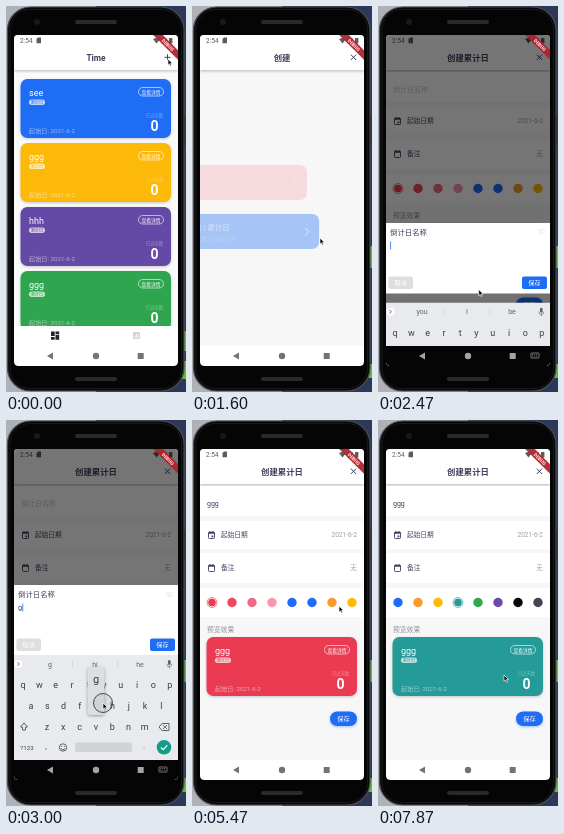
An HTML page with a canvas for the animation above (8 s loop, 180x386 px).

```html
<!DOCTYPE html>
<html lang="zh">
<head>
<meta charset="utf-8">
<style>
html, body { margin: 0; width: 100%; height: 100%; overflow: hidden; background: #20283a; }
canvas { display: block; width: 180px; height: 386px; }
</style>
</head>
<body>
<canvas id="stage"></canvas>
<script>
const canvas = document.getElementById('stage');
const g = canvas.getContext('2d');
const dpr = window.devicePixelRatio || 1;
canvas.width = 180 * dpr;
canvas.height = 386 * dpr;

const LOOP = 8000;
const INK = '#40415f', BLUE = '#1f6cf5', RED = '#eb3b53', TEAL = '#249a99';
const FONT = 'Roboto, "Noto Sans CJK SC", "Noto Sans CJK", sans-serif';
const SWATCHES = [RED, '#ed4860', '#f06c84', '#f797aa', BLUE, BLUE, '#f99a2c', '#fdba0a',
  TEAL, '#33a853', '#6c4aaa', '#08080a', '#454354'];

const clamp = v => Math.max(0, Math.min(1, v));
const ramp = (t, a, b) => clamp((t - a) / (b - a));
const smooth = v => v * v * (3 - 2 * v);
const ease = (t, a, b) => smooth(ramp(t, a, b));

// Pointer stops: time, x, y
const POINTER = [
  [0, 162, 53], [400, 162, 53], [1050, 128, 232], [1600, 128, 232], [1880, 60, 84], [2030, 60, 84],
  [2200, 112, 285], [2600, 97, 283], [3780, 97, 283], [4200, 152, 233], [4560, 152, 233],
  [5300, 147, 186], [5600, 147, 186], [6300, 47, 186], [6550, 47, 186], [7150, 80, 184],
  [7700, 80, 184], [7870, 126, 255], [8000, 126, 255]
];
// Pointer held down: from, to
const PRESSES = [[90, 200], [1380, 1480], [1940, 2040], [2920, 3060], [3320, 3440], [3600, 3720],
  [4350, 4450], [5600, 6300], [7260, 7380]];
const KEY_TIMES = [2920, 3320, 3600];

function box(x, y, w, h, r, fill, stroke, lw = .7) {
  g.beginPath();
  g.roundRect(x, y, w, h, r);
  if (fill) { g.fillStyle = fill; g.fill(); }
  if (stroke) { g.strokeStyle = stroke; g.lineWidth = lw; g.stroke(); }
}

function dot(x, y, r, fill, stroke, lw = .8) {
  box(x - r, y - r, 2 * r, 2 * r, r, fill, stroke, lw);
}

function line(points, color, lw = 1, fill) {
  g.beginPath();
  points.forEach(([x, y], i) => i ? g.lineTo(x, y) : g.moveTo(x, y));
  if (fill) { g.closePath(); g.fillStyle = fill; g.fill(); }
  if (color) { g.strokeStyle = color; g.lineWidth = lw; g.stroke(); }
}

function text(s, x, y, size, color, weight = 400, align = 'left') {
  g.font = `${weight} ${size}px ${FONT}`;
  g.textAlign = align;
  g.fillStyle = color;
  g.fillText(s, x, y);
}

function layer(alpha, dx, dy, draw) {
  if (alpha <= 0) return;
  g.save();
  g.globalAlpha *= alpha;
  g.translate(dx, dy);
  draw();
  g.restore();
}

function shadowed(blur, color, draw) {
  g.save();
  g.shadowBlur = blur * dpr;
  g.shadowOffsetY = dpr;
  g.shadowColor = color;
  draw();
  g.restore();
}

function page(title, bg) {
  box(8, 29, 164, 311, 0, bg);
  shadowed(3, '#0004', () => box(8, 29, 164, 35, 0, '#fff'));
  text(title, 90, 54.5, 8.4, INK, 700, 'center');
}

function closeIcon() {
  line([[158.8, 48.6], [164.2, 54]], INK, 1);
  line([[164.2, 48.6], [158.8, 54]], INK, 1);
}

function timeCard(y, color, title) {
  shadowed(3, '#0003', () => box(14.5, y, 150.5, 59, 7, color));
  text(title, 23, y + 17, 9, '#fff');
  box(23, y + 20.5, 16, 5.5, 2.7, '#ffffffb8');
  text('累计日', 31, y + 25, 4, color, 500, 'center');
  text('起始日: 2021-6-2', 23, y + 53.5, 6.2, '#ffffff88');
  box(132.5, y + 8.5, 25, 8.5, 4.2, null, '#fffd');
  text('查看详情', 145, y + 14.8, 4.8, '#fff', 500, 'center');
  text('已过天数', 148.5, y + 37.5, 4.3, '#ffffff66', 400, 'center');
  text('0', 148.5, y + 52, 14, '#fff', 700, 'center');
}

function home() {
  page('Time', '#fafafa');
  line([[158.5, 51.3], [164.5, 51.3]], INK, 1);
  line([[161.5, 48.3], [161.5, 54.3]], INK, 1);
  timeCard(73, BLUE, 'see');
  timeCard(137, '#fdb908', 'ggg');
  timeCard(201, '#6449a6', 'hhh');
  timeCard(265, '#30a550', 'ggg');
  shadowed(3, '#0003', () => box(8, 320, 164, 20, 0, '#fff'));
  for (const [x, y, h] of [[45, 325.5, 4.6], [49.5, 325.5, 2.7], [45, 331, 2.7], [49.5, 329.1, 4.6]])
    box(x, y, 3.7, h, 0, '#222');
  box(127, 326, 7, 7, 1, '#d4d4d4');
  [[128.5, 2], [130.2, 4], [131.9, 3]].forEach(([x, h]) => box(x, 331.7 - h, .8, h, 0, '#fff'));
}

function choice(y, color, title, note) {
  box(14, y, 151, 35, 7, color);
  text(title, 33, y + 16, 7.4, '#fff', 700);
  text(note, 33, y + 27, 6, '#ffffff99');
  line([[151, y + 14], [154.6, y + 17.8], [151, y + 21.6]], '#fff', 1.3);
}

function create(t) {
  page('创建', '#f7f7f8');
  closeIcon();
  const slide = (start, end, draw) => {
    const k = ramp(t, start, start + 220) - ramp(t, end, end + 157);
    layer(k, -60 * (1 - k), 0, draw);
  };
  slide(420, 1470, () => choice(159, '#ef4a5c', '倒数 | 纪念日', '未来·重要日期卡片'));
  slide(500, 1502, () => choice(208, BLUE, '正数 | 累计日', '过去·累计日期卡片'));
}

function calendar(x, y, filled) {
  box(x - 3, y - 2.8, 6, 6.3, .8, null, INK, .9);
  box(x - 3, y - 3, 6, 1.8, 0, INK);
  box(x - 2, y - 4, .9, 1.5, 0, INK);
  box(x + 1.1, y - 4, .9, 1.5, 0, INK);
  if (filled) box(x, y + .5, 1.8, 1.8, 0, INK);
}

function form(t, name) {
  page('创建累计日', '#f7f7f8');
  closeIcon();
  [[66, 30], [101, 28], [133, 30], [168, 29]].forEach(([y, h]) => box(8, y, 164, h, 0, '#fff'));
  text(name || '倒计日名称', 15, 85.5, 7, name ? INK : '#c8c8cc');
  calendar(19.5, 115, true);
  text('起始日期', 29, 117.3, 6.7, INK, 500);
  text('2021-6-2', 165, 117, 6.5, '#a0a0a6', 400, 'right');
  calendar(19.5, 148);
  text('备注', 29, 150.3, 6.7, INK, 500);
  text('无', 165, 150.3, 6.7, '#a0a0a6', 400, 'right');

  const picked = t < 7320 ? 0 : 8;
  const scroll = 100 * ease(t, 5600, 6300);
  g.save();
  g.beginPath();
  g.rect(8, 168, 164, 29);
  g.clip();
  SWATCHES.forEach((c, i) => {
    const x = 20 + i * 20 - scroll;
    dot(x, 182.5, i === picked ? 3.8 : 4.7, c);
    if (i === picked) dot(x, 182.5, 4.9, null, c, .7);
  });
  g.restore();

  text('预览效果', 15, 211.5, 6.8, '#8f8f96');
  timeCard(217, SWATCHES[picked], name || '累计日');
  shadowed(3, '#1f6cf566', () => box(138, 291.5, 27, 14.5, 7.2, BLUE));
  text('保存', 151.5, 301, 6.2, '#fff', 500, 'center');
}

function sheet(t, typed) {
  box(8, 165, 164, 70.5, 0, '#fff');
  text('倒计日名称', 12, 177, 7.4, INK, 500);
  text('30', 167, 176.5, 6.5, '#e4e4e6', 400, 'right');
  text(typed, 12, 190, 7.4, INK);
  const caret = 12.6 + g.measureText(typed).width;
  line([[caret, 183.5], [caret, 191.5]], BLUE, .8);
  box(10.5, 218.5, 24.5, 12.5, 2, '#dedee0');
  text('取消', 22.7, 227.2, 6.2, '#fff', 500, 'center');
  box(144, 218.5, 25, 12.5, 2, BLUE);
  text('保存', 156.5, 227.2, 6.2, '#fff', 500, 'center');
}

function keyboard(typed, keyDown) {
  const key = '#3c4043';
  box(8, 235, 164, 125, 0, '#e8eaed');
  dot(12.5, 244, 4, '#fff');
  line([[11.6, 242.2], [13.4, 244], [11.6, 245.8]], key, .8);
  const words = typed.length === 1 ? ['g', 'hi', 'he'] : ['you', 'I', 'be'];
  words.forEach((w, i) => text(w, 44 + 45 * i, 246.5, 7, '#5f6368', 400, 'center'));
  [66.5, 111.5].forEach(x => line([[x, 240], [x, 248]], '#cfd1d4', .6));
  box(162, 240, 2.6, 5, 1.3, '#5f6368');
  line([[160.8, 243.8], [161.6, 246.3], [165, 246.3], [165.8, 243.8]], '#5f6368', .6);
  line([[163.3, 246.3], [163.3, 248.3]], '#5f6368', .7);
  [['qwertyuiop', 17, 268], ['asdfghjkl', 25, 289], ['zxcvbnm', 41, 310]].forEach(([row, x, y]) =>
    [...row].forEach((c, i) => text(c, x + 16.3 * i, y, 9, key, 400, 'center')));
  line([[18, 303], [14.5, 307], [16.5, 307], [16.5, 310], [19.5, 310], [19.5, 307], [21.5, 307], [18, 303]], key, .8);
  line([[153, 307], [156, 303.5], [163, 303.5], [163, 310.5], [156, 310.5], [153, 307]], key, .8);
  line([[157, 305], [161, 309]], key, .7);
  line([[161, 305], [157, 309]], key, .7);
  text('?123', 21, 330, 6.2, key, 400, 'center');
  text(',', 40, 329, 8, key, 400, 'center');
  dot(57, 327.5, 3.7, null, key);
  dot(55.7, 326.5, .5, key);
  dot(58.3, 326.5, .5, key);
  g.beginPath();
  g.arc(57, 327.7, 2, .2, Math.PI - .2);
  g.stroke();
  box(69, 322.5, 57, 9.5, 2, '#d0d3d7');
  text('.', 138, 329, 8, key, 400, 'center');
  dot(158, 327.3, 7.3, '#129d8b');
  line([[155, 327.5], [157.3, 329.7], [161.3, 325.2]], '#fff', 1.1);
  if (keyDown) {
    shadowed(3, '#0005', () => box(81.5, 247, 17, 48, 3, '#dcdee1'));
    text('g', 90, 263, 11, key, 400, 'center');
  }
}

function navBar(dark) {
  const c = dark ? '#a4a4a4' : '#737373';
  box(8, 340, 164, 20, [0, 0, 4, 4], dark ? '#050505' : '#fff');
  line([[41, 350], [47, 346.5], [47, 353.5]], null, 0, c);
  dot(90, 350, 3.2, c);
  box(131.7, 347, 6, 6, .5, c);
  if (dark) {
    box(153, 347, 8, 5, .5, null, c, .7);
    for (let i = 0; i < 6; i++) box(154.2 + i % 3 * 2, 348.2 + (i > 2) * 1.5, 1, .8, 0, c);
  }
}

function statusBar() {
  const c = '#5c5c5c';
  text('2:54', 14, 37.3, 6.5, c);
  line([[30.5, 33], [32, 31.5], [35, 31.5], [35, 37.3], [30.5, 37.3]], null, 0, c);
  line([[147, 33], [150.5, 31.8], [154, 33], [150.5, 37.5]], null, 0, c);
  line([[160.5, 31.7], [160.5, 37.3], [155, 37.3]], null, 0, c);
  box(163, 32, 3.4, 5.5, .6, c);
}

function banner() {
  g.save();
  g.beginPath();
  g.rect(8, 29, 164, 331);
  g.clip();
  g.translate(162, 39);
  g.rotate(Math.PI / 4);
  box(-24, -3.4, 48, 6.8, 0, '#b51f2aee');
  text('DEBUG', 0, 1.7, 4.6, '#fff', 700, 'center');
  g.restore();
}

function phone(t) {
  box(0, 0, 180, 386, 0, '#aeb2b8');
  box(90, 0, 90, 386, 0, '#2b3857');
  const greens = t < 900 ? [[325, 20], [355, 18]] : [[240, 22], [358, 14]];
  greens.forEach(([y, h]) => box(175, y, 5, h, 0, '#55c22e'));
  box(176, 110, 3, 30, 1, '#15161a');
  box(1.5, 1, 176.5, 384, 23, '#08090a', '#4b4d50', 1.2);
  box(4, 3.5, 171.5, 379, 20, '#050506', '#1d1e20', .8);
  box(69, 14, 42, 4, 2, '#292a2c');
  box(69, 371, 42, 4, 2, '#292a2c');
  dot(31, 16, 3, '#17191d');
}

function pointer(t) {
  const i = POINTER.findIndex(p => p[0] > t);
  const [a, b] = [POINTER[i - 1], POINTER[i]];
  const k = ease(t, a[0], b[0]);
  const x = a[1] + (b[1] - a[1]) * k, y = a[2] + (b[2] - a[2]) * k;
  if (PRESSES.some(([from, to]) => t >= from && t < to)) dot(x, y, 9.5, '#0000000c', '#222', .8);
  const arrow = [[0, 0], [0, 6.2], [1.5, 4.9], [2.6, 7.2], [3.6, 6.7], [2.6, 4.5], [4.5, 4.4], [0, 0]];
  line(arrow.map(([px, py]) => [x + px, y + py]), '#fff', .7, '#000');
}

function draw(t) {
  g.setTransform(dpr, 0, 0, dpr, 0, 0);
  phone(t);
  g.save();
  g.beginPath();
  g.roundRect(8, 29, 164, 331, 4);
  g.clip();

  const typed = 'g'.repeat(KEY_TIMES.filter(k => t >= k).length);
  const created = ease(t, 150, 420), formed = ease(t, 1640, 1840);
  if (created < 1) home();
  if (formed < 1) layer(created, 0, 12 * (1 - created), () => create(t));
  layer(formed, 0, 0, () => form(t, t > 4420 ? typed : ''));
  statusBar();

  const raised = ease(t, 2340, 2600) - ease(t, 4420, 4640);
  const dim = ramp(t, 2060, 2260) - ramp(t, 4500, 4740);
  const shown = ramp(t, 2080, 2250) - ramp(t, 4500, 4740);
  layer(dim, 0, 0, () => box(8, 29, 164, 331, 0, '#0000008a'));
  layer(shown, 0, 105 * (1 - raised), () => sheet(t, typed));
  if (raised > 0) {
    const keyDown = KEY_TIMES.some(k => t >= k && t < k + 130);
    layer(1, 0, 125 * (1 - raised), () => keyboard(typed, keyDown));
  }
  navBar(raised > .4);
  banner();
  g.restore();
  pointer(t);
}

const start = performance.now();
function tick() {
  draw((performance.now() - start) % LOOP);
  requestAnimationFrame(tick);
}
tick();
</script>
</body>
</html>
```
